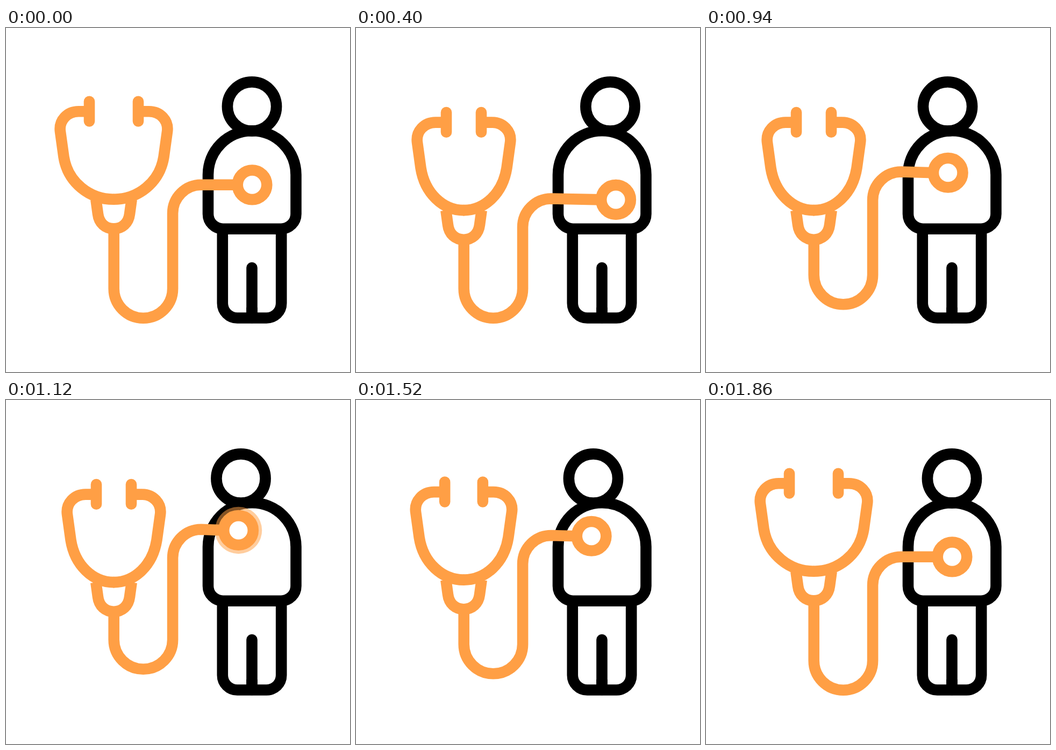
These frames come from a looping animation (640x640 px, 2400 ms). An HTML page:

```html
<!DOCTYPE html>
<html lang="en">
<head>
<meta charset="utf-8">
<title>Stethoscope check-up</title>
<style>
  html, body { margin: 0; height: 100%; overflow: hidden; background: #fff; }
  svg { display: block; width: 100vw; height: 100vh; }
</style>
</head>
<body>
<svg viewBox="0 0 640 640" fill="none" stroke-width="20.6">
  <g stroke="#000">
    <circle id="head" cy="146" r="45.6"/>
    <path d="M376 273a81.75 81.75 0 0 1 163.5 0V346a27.7 27.7 0 0 1-27.7 27.7H403.7A27.7 27.7 0 0 1 376 346Z"/>
    <path d="M402.8 374V512a27.5 27.5 0 0 0 27.5 27.5H484.7A27.5 27.5 0 0 0 512.2 512V374"/>
    <path d="M457.5 446V539" stroke-linecap="round"/>
    <path d="M457.5 520V539"/>
  </g>
  <circle id="pulse" fill="#ff9f45" fill-opacity=".52"/>
  <g stroke="#ff9f45">
    <path id="tube"/>
    <g id="headset">
      <path d="M167.3 319L171 346C173 363 185 373.4 200.5 373.4S228 363 230 346L233.7 319"/>
      <path class="arm"/>
      <path class="ear" stroke-linecap="round"/>
      <g transform="matrix(-1 0 0 1 401 0)">
        <path class="arm"/>
        <path class="ear" stroke-linecap="round"/>
      </g>
    </g>
    <circle id="chest" r="27.3" fill="#fff"/>
  </g>
</svg>
<script>
const LOOP = 2400, MOVE = 400;
const $ = id => document.getElementById(id);
const set = (el, attrs) => { for (const k in attrs) el.setAttribute(k, attrs[k]); };
const setAll = (name, d) => document.querySelectorAll(name).forEach(el => set(el, { d }));

const ease = (t, start) => {
  const s = Math.min(1, Math.max(0, (t - start) / MOVE));
  return s * s * (3 - 2 * s);
};
// A beat that swells and sinks while the chest piece rests
const beat = (t, start) => {
  const s = (t - start) / 300;
  return s > 0 && s < 1 ? Math.sin(Math.PI * s) : 0;
};

function draw(now) {
  const t = now % LOOP;
  const low = ease(t, 0), high = ease(t, 700), back = ease(t, 1400);
  const pose = (rest, a, b) => rest + (a - rest) * low + (b - a) * high + (rest - b) * back;

  const cx = pose(458, 483.5, 432.5), cy = pose(291.8, 319.4, 242.4);
  const bend = pose(291.8, 317.5, 240.8);
  const base = pose(485, 485, 446);
  const squeeze = low - back, dx = 13 * squeeze, dy = 20.3 * squeeze;

  set($('head'), { cx: pose(457.5, 473, 437) });
  set($('chest'), { cx, cy });
  const swell = beat(t, 400) + beat(t, 1100);
  set($('pulse'), { cx, cy, r: swell ? 37.4 + 29 * swell : 0 });

  set($('tube'), { d: `M200.7 ${372 + dy}V${base}a54.7 54.7 0 0 0 109.4 0` +
    `V${bend + 53}A53 53 0 0 1 363 ${bend}L${cx - 28} ${cy}` });

  set($('headset'), { transform: `translate(0 ${dy})` });
  setAll('.ear', `M${155 + dx} 136.8V173.5`);
  setAll('.arm', `M${155 + dx} 155.3H${135 + dx}` +
    `C${114 + dx} 155.3 ${98 + dx} 172 ${101 + dx} 193L${107.5 + dx} 240` +
    `C${115 + dx} 287 ${155 + dx / 2} 318.8 200.5 318.8h1`);
}

const begin = performance.now();
function tick() {
  draw(performance.now() - begin);
  requestAnimationFrame(tick);
}
tick();
</script>
</body>
</html>
```
